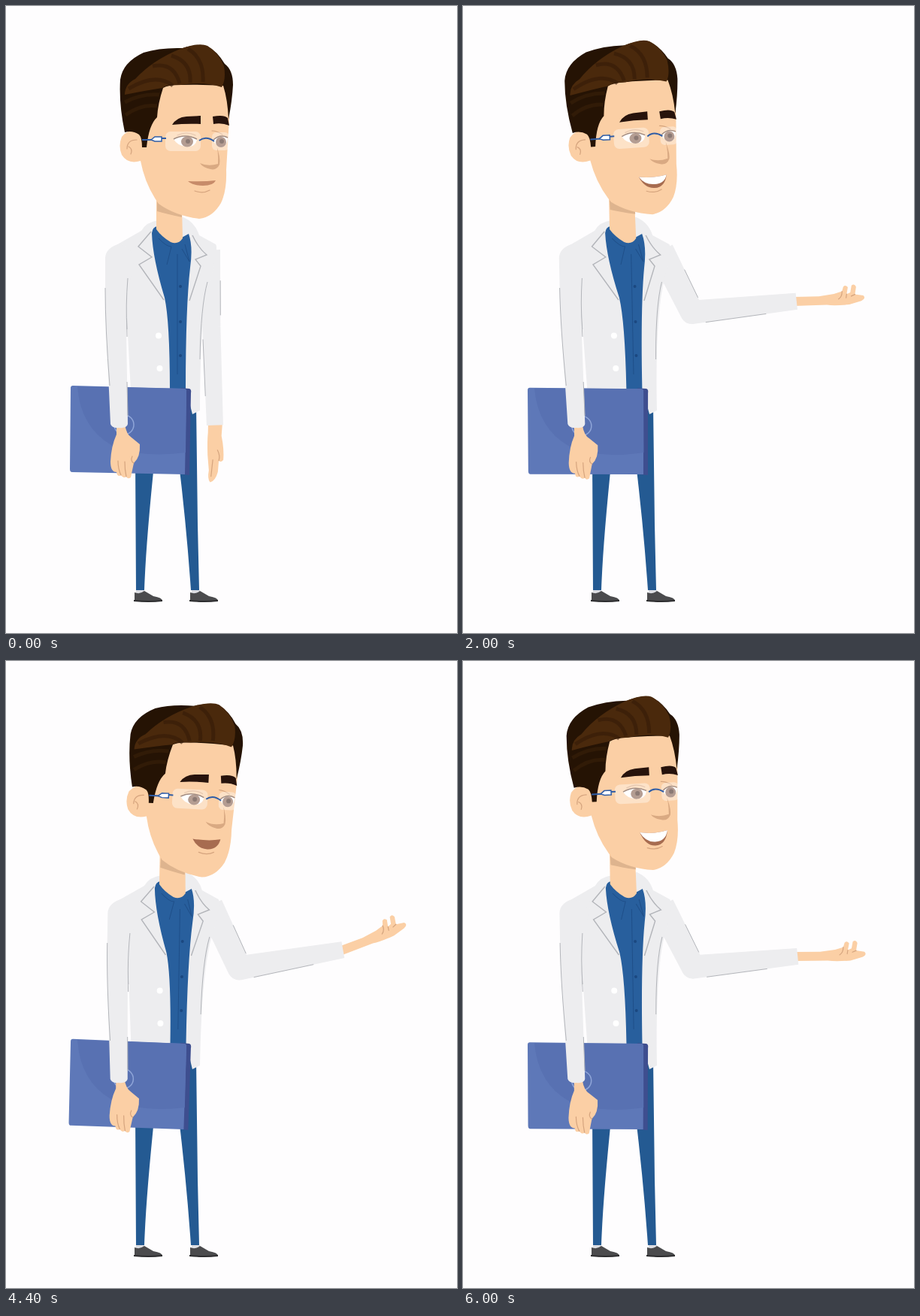
Animation, 600 px wide and 834 px high, one loop 6.1 s. Source, as an HTML page:

```html
<!DOCTYPE html>
<html lang="en">
<meta charset="utf-8">
<title>Doctor presenting</title>
<style>
html, body { margin: 0; height: 100%; overflow: hidden; background: #fefdfe }
svg { display: block; width: 600px; height: 834px }
.skin { fill: #fbcfa5 }
.coat { fill: #ededef }
.line { fill: none; stroke: #b3b5ba; stroke-width: 1.4 }
.thin { fill: none; stroke: #d5a47e; stroke-width: 1.2; stroke-linecap: round }
.blue { fill: none; stroke: #2f5da6; stroke-width: 2 }
.streak { fill: none; stroke: #331b08; stroke-width: 5; opacity: .55 }
</style>
<svg viewBox="0 0 600 834">
  <g fill="#245a92">
    <path d="M172 600L173 777H184Q186 715 198 600Z"/>
    <path d="M229 600Q240 690 246 777H257L255 690 253 530H235Z"/>
  </g>
  <g id="shoe">
    <path fill="#dcdde2" d="M173 777H184V783H173Z"/>
    <path fill="#4b4b4d" d="M171 780Q178 783 184 778L196 785Q208 787 208 791Q190 794 171 791Z"/>
    <path fill="#2d2d2f" d="M170 790Q190 792 208 790V792Q190 794 170 792Z"/>
  </g>
  <use href="#shoe" x="74"/>

  <g id="hand">
    <path id="palm" class="skin"/>
    <path id="fingers" class="thin"/>
  </g>
  <path id="sleeve" class="coat"/>
  <path id="creases" class="line" style="stroke-width:1"/>

  <g class="body">
    <path class="coat" d="M145 319L180 299Q187 287 203 285L236 281Q252 288 257 305L279 317Q283 322 272 362Q258 410 258 538L248 543 240 512H166L160 400Z"/>
    <path fill="#285f9d" d="M194 302Q195 294 201 293L232 309 243 303Q249 320 245 348Q239 400 239 512H218Q218 420 211 388Q195 335 194 302Z"/>
    <path fill="none" stroke="#1f4f89" d="M203 309Q213 320 220 320L214 344M238 317L244 340 234 323M228 330V490"/>
    <g fill="#1b4880"><circle cx="232" cy="373" r="2"/><circle cx="232" cy="420" r="2"/><circle cx="232" cy="465" r="2"/></g>
    <path class="line" d="M193 300L176 320 194 334 177 344 210 391M248 305Q256 322 267 331L252 337 259 346 244 392"/>
    <path class="line" style="stroke-width:1" d="M268 367Q259 400 258 470M162 362Q159 400 161 440"/>
    <g fill="#fff"><circle cx="203" cy="438.500" r="4"/><circle cx="204.500" cy="482" r="4"/></g>
  </g>

  <g class="held">
    <path fill="#3e4e8f" d="M232 508L244 509Q247 510 246 515L244 624 234 623Z"/>
    <path fill="#5e78b8" d="M89 505L237 509Q240 509 240 513L238 623 88 620Q85 620 85 616L86 508Q86 505 89 505Z"/>
    <path fill="#5871b2" d="M95 506L237 509Q240 509 240 513L239 594Q180 602 140 584Q99 560 95 506Z"/>
    <circle cx="157" cy="557" r="13" fill="none" stroke="#8fa5d8" stroke-width="1.500"/>
    <path class="skin" d="M147 556H158Q160 570 167 574L178 583Q179 600 170 608L166 627Q162 630 160 626Q156 629 153 624Q148 627 147 620Q139 620 139 606Q140 585 147 570Z"/>
    <path class="thin" d="M149 605Q149 616 153 624M158 606Q158 617 160 626M170 608Q165 605 168 599"/>
  </g>
  <g class="body">
    <path class="coat" d="M152 316Q133 321 132 335V400L139 556Q141 562 150 561Q161 562 162 556L160 430Q162 370 172 330Z"/>
    <path class="line" style="stroke-width:1" d="M132 375Q132 430 138 505M162 362Q159 400 161 430M161 500L162 545"/>
    <path class="skin" d="M200 255L234 268 235 309Q229 318 219 314Q207 307 200 297Z"/>
  </g>

  <g id="head">
    <path fill="#deb48e" d="M201 255L234 272V281Q215 277 201 273Z"/>
    <path class="skin" d="M206 95L190 165Q165 160 154 174Q149 186 154 198Q162 211 179 206Q185 238 203 263Q225 279 257 283Q275 281 286 262Q294 245 293 218L297 150V105L280 90Z"/>
    <path class="thin" d="M174 178Q161 178 161 190M163 187Q169 190 166 197"/>
    <path fill="#251304" d="M158 168Q150 130 152 98Q155 75 183 62Q205 55 235 56Q255 50 267 53Q281 60 291 77Q302 85 302 105Q301 125 296 151Q295 125 289 106Q255 104 233 105Q215 105 209 109Q202 130 201 148Q190 158 187 188H181Q181 175 177 171Q168 165 158 168Z"/>
    <path fill="#4a290c" d="M172 97Q195 72 232 57Q257 48 268 53Q283 62 290 80Q293 98 287 108Q262 100 233 105Q215 104 208 109Q188 112 158 118Q158 104 172 97Z"/>
    <path class="streak" d="M163 110Q200 88 222 106M195 80Q223 74 231 103M220 66Q247 74 245 102M242 57Q264 70 262 101"/>
    <path class="streak" style="stroke:#3b210a" d="M158 128Q180 116 204 118M159 145Q180 130 201 133"/>

    <path fill="#fff" d="M223 177Q238 168 254 178Q252 188 240 187Q228 186 223 177ZM276 179Q285 170 295 176Q294 187 286 188Q279 186 276 179Z"/>
    <g fill="#86604f"><ellipse cx="241" cy="180.500" rx="8" ry="7"/><ellipse cx="286" cy="181" rx="7" ry="7"/></g>
    <g fill="#45281f"><circle cx="242" cy="180" r="3"/><circle cx="287" cy="180" r="3"/></g>
    <path fill="none" stroke="#6b4735" stroke-width="1.500" d="M223 177Q238 169 254 177M276 178Q285 170 295 175"/>
    <path class="thin" d="M228 172Q240 166 252 172M274 166Q280 166 288 171"/>
    <g fill="#fff" opacity=".38"><rect x="212" y="167" width="47" height="26" rx="7"/><rect x="274" y="168" width="23" height="24" rx="6"/></g>
    <path class="blue" d="M181 178H195M207 176L213 176M257 179Q266 172 277 180"/>
    <path class="blue" style="stroke-width:1.500;fill:#fff" d="M193 178L198 174H207V180H198Z"/>
    <path fill="#27130c" d="M221 158Q227 148 240 147L259 146V157Q240 156 221 158ZM275 147Q290 144 295 149L297 159Q287 155 276 157Z"/>
    <path fill="#d9a982" d="M258 209Q269 214 282 210Q283 192 279 183Q286 202 284 211Q280 219 272 217Q262 215 258 209Z"/>
    <path id="lips" fill="#c78b69"/>
    <path id="teeth" fill="#fff"/>
    <path id="chin" class="thin"/>
  </g>
</svg>
<script>
const LOOP = 6100, STEP = 100, RAD = Math.PI / 180;
const $ = id => document.getElementById(id);

// time, upper arm, forearm and hand angles
const ARM = [
  [0, 87, 88, 91], [100, 86, 86, 90], [300, 76, 45, 40], [600, 65, -18, -30],
  [1100, 64, -8, -6], [1400, 65.7, -12.8, -18.6], [1800, 64, -7, -6], [2200, 63, -5, 0],
  [2500, 65.7, -16.6, -20], [2900, 65, -13, -18], [3200, 67, -3, 0], [3600, 79, 53, 58.6],
  [3800, 83, 70, 78], [4200, 66, 18, 30], [4400, 65, -10, -22], [4800, 65.5, -10.2, -15],
  [5200, 65, -14, -20], [6000, 63, -5.8, -2]
];
// time, forward lean
const LEAN = [
  [0, 0], [200, 0], [600, 1], [1100, -1.1], [1400, 0], [1700, .8], [2000, -1], [2250, .6],
  [2500, 0], [2900, 0], [3400, -1.1], [3600, -.7], [4000, -1], [4400, .8], [4800, -1.4],
  [5200, -.6], [5500, -.2], [5800, -1.1], [6000, -.85]
];
// mouth opening in tenths, one digit per 200 ms
const TALK = "0000365425730046300475203573690".slice(0, 12) + "0046300" + "04752" + "0" + "35736" + "9";

const OPEN_HAND = "M-4-6L30-5 50-7 61-10 63-16Q66-19 69-15L67-6 72-8 74-17Q78-20 80-15L78-5 89-3Q93 1 86 4L70 8Q50 9 40 7L-4 6Z";
const LOOSE_HAND = "M-4-10L14-9Q32-13 46-12Q50-9 47-6L62-5Q74-2 76 5Q72 9 60 7L40 9Q20 10 10 9L-4 9Z";

function sample(keys, t) {
  const i = keys.findIndex(k => k[0] > t);
  if (i < 0) return keys[keys.length - 1].slice(1);
  const a = keys[i - 1], b = keys[i];
  let u = (t - a[0]) / (b[0] - a[0]);
  u *= u * (3 - 2 * u);
  return a.slice(1).map((v, j) => v + (b[j + 1] - v) * u);
}

const along = (p, deg, d) => [p[0] + Math.cos(deg * RAD) * d, p[1] + Math.sin(deg * RAD) * d];
const mix = (a, b, u) => [a[0] + (b[0] - a[0]) * u, a[1] + (b[1] - a[1]) * u];
const limb = (a, b, deg, ra, rb) =>
  `M${along(a, deg - 90, ra)}L${along(b, deg - 90, rb)} ${along(b, deg + 90, rb)} ${along(a, deg + 90, ra)}Z`;

function drawArm(t, lean) {
  const [upper, fore, hand] = sample(ARM, t);
  const shoulder = [268 + 4.5 * lean, 325];
  const elbow = along(shoulder, upper, 92 + Math.max(0, upper - 65) * .48);
  const cuff = along(elbow, fore, 140 - Math.max(0, fore) * .11);
  const r = 12 + 4 * Math.min(1, Math.max(0, upper - fore) / 75);
  const [x, y] = elbow;
  $("sleeve").setAttribute("d", limb(shoulder, elbow, upper, 17, r) + limb(elbow, cuff, fore, r, 11) +
    `M${x - r} ${y}a${r} ${r} 0 1 1 ${2 * r} 0a${r} ${r} 0 1 1 ${-2 * r} 0Z`);
  const edge = (a, b, deg, ra, rb, from, to) => {
    const p = along(a, deg, ra), q = along(b, deg, rb);
    return `M${mix(p, q, from)}L${mix(p, q, to)}`;
  };
  $("creases").setAttribute("d", edge(shoulder, elbow, upper - 90, 17, r, .4, .85) +
    edge(elbow, cuff, fore + 90, r, 11, .12, .7));
  const raised = hand < 32;
  $("hand").setAttribute("transform", `translate(${cuff}) rotate(${hand})`);
  $("palm").setAttribute("d", raised ? OPEN_HAND : LOOSE_HAND);
  $("fingers").setAttribute("d", raised ? "M61-10Q61-3 56 0M67-6L66-1M78-5L73-3" : "M47-6Q40-8 33-4M46 2L68 4");
}

function drawMouth(open) {
  const low = 239 + 13 * open, top = 233 + 2 * open;
  const curve = y => `M242 ${233 - open}Q262 ${top + 1} 279 ${232 - open}Q276 ${y} 262 ${y}Q249 ${y} 242 ${233 - open}Z`;
  $("lips").setAttribute("d", curve(low));
  $("lips").setAttribute("fill", open > .15 ? "#a76c50" : "#c78b69");
  $("teeth").setAttribute("d", open > .5 ? curve(low - 5) : "");
  const c = 246 + 8 * open;
  $("chin").setAttribute("d", `M251 ${c}Q262 ${c + 4} 271 ${c - 1}`);
}

function draw(now) {
  const t = Math.floor(now % LOOP / STEP) * STEP;
  const [lean] = sample(LEAN, t);
  const skew = .0205 * lean;
  for (const g of document.querySelectorAll(".body"))
    g.setAttribute("transform", `matrix(1 0 ${-skew} 1 ${540 * skew} 0)`);
  document.querySelector(".held").setAttribute("transform", `rotate(${lean} 245 510)`);
  $("head").setAttribute("transform", `translate(${5.2 * lean} ${3 * lean}) rotate(${3.8 * lean} 215 275)`);
  drawArm(t, lean);
  drawMouth(TALK[t / 200 | 0] / 10);
  requestAnimationFrame(draw);
}
const start = performance.now();
const tick = () => { draw(performance.now() - start); };
requestAnimationFrame = (raf => () => raf.call(window, tick))(requestAnimationFrame);
tick();
</script>
</html>
```
